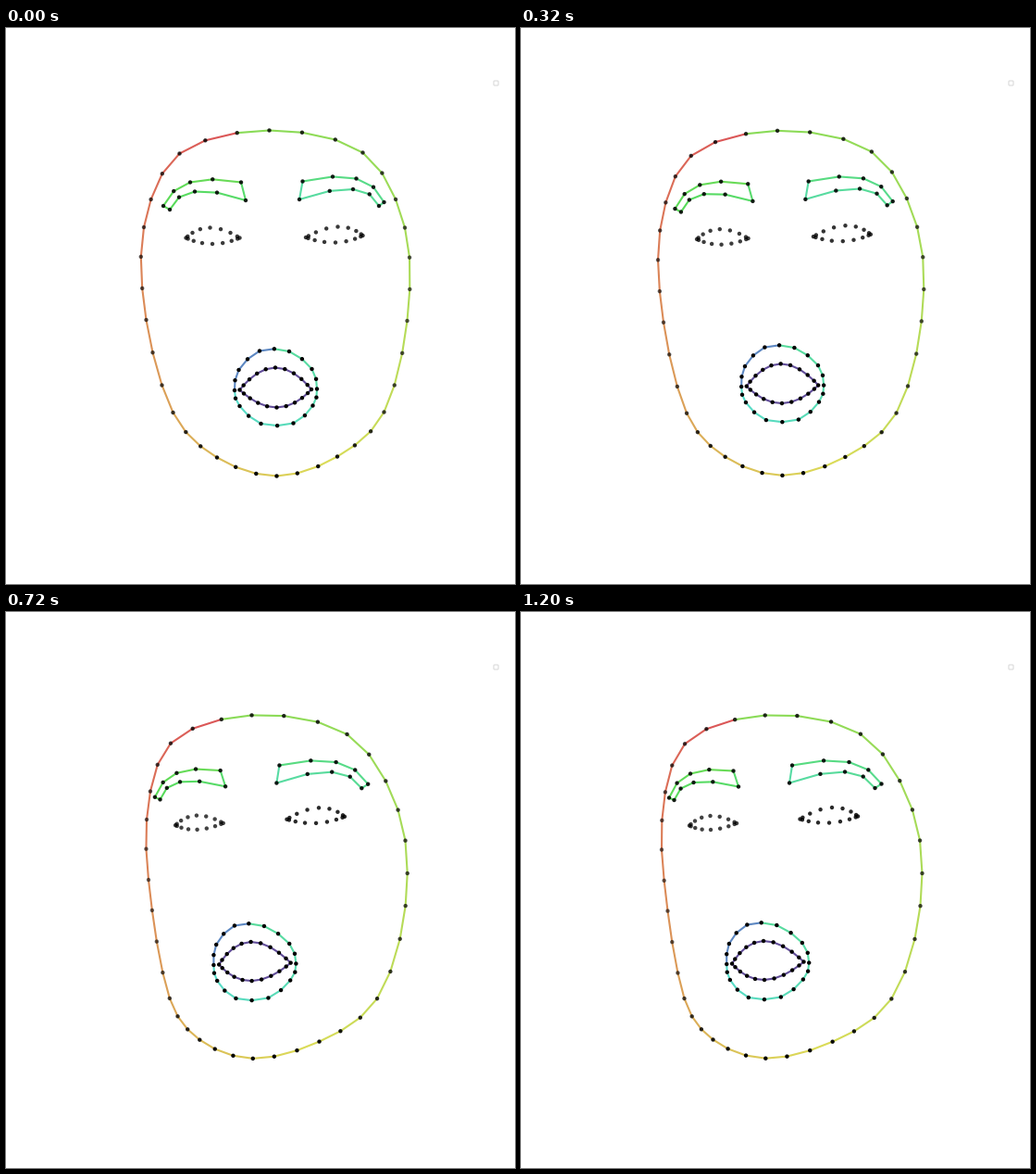
Animation, 550 px wide and 600 px high, one loop 1.28 s. Source, as a matplotlib script:

```python
import colorsys

import matplotlib.pyplot as plt
import numpy as np
from matplotlib.animation import FuncAnimation
from matplotlib.collections import LineCollection
from matplotlib.patches import FancyBboxPatch

WIDTH, HEIGHT, DPI = 550, 600, 100
STEPS, INTERVAL = 16, 80


def spline(keys, step):
    """Closed Catmull-Rom curve with `step` points per key."""
    a = np.array(keys, float)[:, None]
    b = np.roll(a, -1, axis=0)
    slope_a = (b - np.roll(a, 1, axis=0)) / 2
    slope_b = np.roll(slope_a, -1, axis=0)
    t = np.arange(step)[None, :, None] / step
    curve = (a * (1 + 2 * t) * (1 - t) ** 2 + slope_a * t * (1 - t) ** 2
             + b * t ** 2 * (3 - 2 * t) + slope_b * t ** 2 * (t - 1))
    return curve.reshape(-1, 2)


def arc(start, middle, end, count, bunch=0):
    """Parabola through three points; `bunch` crowds points to its ends."""
    t = np.linspace(0, 1, count)
    t = ((1 - bunch) * t + bunch * (1 - np.cos(np.pi * t)) / 2)[:, None]
    start, middle, end = map(np.array, (start, middle, end))
    return (start * (1 - t) * (1 - 2 * t) + middle * 4 * t * (1 - t)
            + end * t * (2 * t - 1))


def brow(upper, lower):
    return np.vstack([arc(*upper, 5), arc(*lower, 5)])


def almond(left, top, right, bottom, half, bunch):
    return np.vstack([arc(left, top, right, half + 1, bunch)[:-1],
                      arc(right, bottom, left, half + 1, bunch)[:-1]])


def waves(count, mean, *terms):
    """Mean plus (cosine, sine) harmonics around a loop."""
    angle = 2 * np.pi * np.arange(count) / count
    return mean + sum(c * np.cos(n * angle) + s * np.sin(n * angle)
                      for n, (c, s) in enumerate(terms, 1))


def hls(hues):
    return [colorsys.hls_to_rgb(h, .6, .65) for h in hues]


class Part:
    """A closed loop of landmarks moving between two poses."""

    def __init__(self, ax, start, end, shade, end_shade, colors=None):
        self.poses = start, end
        self.shades = shade, end_shade
        self.lines = None
        if colors is not None:
            self.lines = LineCollection([], colors=colors, linewidths=1.5,
                                        capstyle="projecting", zorder=1)
            ax.add_collection(self.lines)
        self.dots = ax.scatter(*start.T, s=10, linewidths=0, zorder=2)

    def pose(self, turn):
        def blend(pair):
            return pair[0] + turn * (pair[1] - pair[0])

        xy = blend(self.poses)
        rgba = np.zeros((len(xy), 4))
        rgba[:, 3] = np.clip(blend(self.shades), 0, 1)
        self.dots.set_offsets(xy)
        self.dots.set_facecolors(rgba)
        if self.lines:
            self.lines.set_segments(
                np.stack([xy, np.roll(xy, -1, axis=0)], axis=1))


fig = plt.figure(figsize=(WIDTH / DPI, HEIGHT / DPI), dpi=DPI,
                 facecolor="white")
ax = fig.add_axes([0, 0, 1, 1])
ax.set_xlim(-.5, WIDTH - .5)
ax.set_ylim(HEIGHT - .5, -.5)
ax.axis("off")

# Face outline, clockwise from the top of the forehead
outline = spline([(284, 110), (385, 134), (430.5, 215), (433, 315.5),
                  (408, 414), (357.5, 462), (292, 483), (227.5, 463),
                  (180, 414.5), (151, 314.5), (148.5, 214.5), (187, 135)], 3)
outline_shift = np.column_stack([
    waves(36, -11, (3.7, -4.5), (-13.5, -2.1)),
    waves(36, 2, (1.4, -3.2), (-2.4, -3.7))])
outline_hues = np.roll(.27 * (1 - np.linspace(0, 1, 36) ** 1.25), -1)

# Outer lip, clockwise from the left corner
outer_lip = spline([(246.5, 390.5), (251, 368.5), (273.5, 348),
                    (305.5, 348.5), (330, 367.5), (335.5, 389), (331, 407),
                    (310, 426), (275, 426.5), (252, 407.5)], 2)
lip_shift = np.column_stack([waves(20, -27.5, (0, 0), (2.7, 0)),
                             np.full(20, -11)])
lip_colors = [(.36, .53, .76)] * 5 + hls(np.linspace(.42, .48, 15))

parts = [
    Part(ax, outline, outline + outline_shift,
         waves(36, .78, (-.085, 0), (.13, 0)),
         waves(36, .78, (-.085, .065), (.13, 0)), hls(outline_hues)),
    Part(ax,
         brow([(253.5, 166), (198.5, 166), (169.5, 191.5)],
              [(176.5, 195.5), (203.5, 176), (258.5, 185.5)]),
         brow([(229, 171), (182.5, 174), (159.5, 200)],
              [(165, 202.5), (186, 183.5), (234.5, 188)]),
         .87, .87, hls(np.linspace(.31, .36, 10))),
    Part(ax,
         brow([(320, 165), (378, 162), (408, 187.5)],
              [(402.5, 191.5), (374.5, 173.5), (316.5, 184.5)]),
         brow([(292.5, 165), (354, 161.5), (389, 185)],
              [(382, 189.5), (349.5, 172), (289.5, 184)]),
         .87, .9, hls(np.linspace(.385, .43, 10))),
    Part(ax,
         almond((194, 226), (220, 215), (252, 226), (222.5, 232.5), 8, 1),
         almond((181.5, 230), (204, 219.5), (232.5, 227.5), (204.5, 234.5),
                8, 1),
         .77, .74),
    Part(ax,
         almond((323.5, 225.5), (358, 214), (385, 223.5), (355.5, 231), 8, 1),
         almond((301, 223), (335.5, 210.5), (363.5, 220), (332.5, 227), 8, 1),
         .78, .84),
    Part(ax, outer_lip, outer_lip + lip_shift, 1, 1, lip_colors),
    Part(ax,
         almond((252, 390), (290.5, 366), (329.5, 389.5), (292, 409), 10, .6),
         almond((227.5, 379), (261.5, 354.5), (305, 377), (262.5, 396.5),
                10, .6),
         1, 1, [(.38, .3, .6)] * 20),
]

# Empty legend frame
ax.add_patch(FancyBboxPatch((526.5, 56.5), 5, 5,
                            boxstyle="round,pad=0,rounding_size=1",
                            facecolor="white", edgecolor="0.86", linewidth=.8))


def draw(step):
    turn = 1 - np.exp(-(step / 5.9) ** 2.1)
    for part in parts:
        part.pose(turn)
    return []


animation = FuncAnimation(fig, draw, frames=STEPS, interval=INTERVAL,
                          init_func=lambda: draw(0), repeat=True,
                          repeat_delay=0, blit=False)
plt.show()
```
